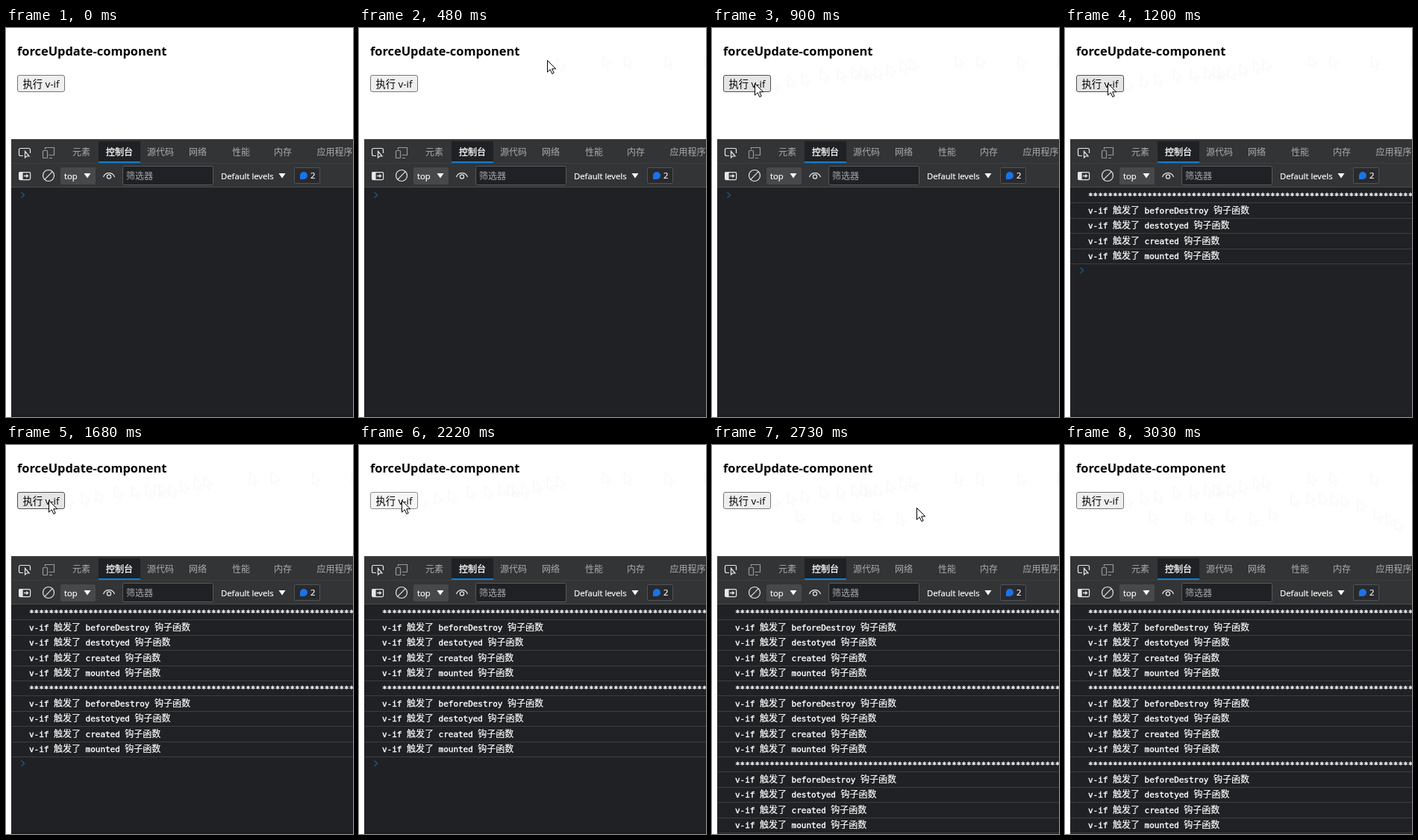
An HTML page that plays this animation: 465 px wide and 522 px high, repeating every 3960 ms.

```html
<!DOCTYPE html>
<html lang="zh-CN">
<head>
<meta charset="utf-8">
<title>forceUpdate-component</title>
<style>
  html, body { margin: 0; width: 100%; height: 100%; overflow: hidden; background: #fff; }
  svg { display: block; width: 465px; height: 522px; }
  text { font-family: "Open Sans", "Noto Sans", "Noto Sans CJK SC", "Noto Sans CJK", sans-serif; white-space: pre; }
  .title { font-weight: 700; font-size: 16.4px; }
  .btn rect { fill: #efefef; stroke: #767676; }
  .btn text { font-size: 13.33px; }
  .btn.hover rect { fill: #e5e5e5; stroke: #4f4f4f; }
  .btn.down rect { fill: #f5f5f5; stroke: #8d8d8d; }
  .tab { font-size: 12px; fill: #a8abae; }
  .tab.on { fill: #fff; stroke: #fff; stroke-width: .3; }
  .ui { font-size: 11.3px; fill: #fff; stroke: #fff; stroke-width: .2; }
  .hint { font-size: 12px; fill: #a3a8ad; }
  .icon { fill: none; stroke: #e6e7e8; stroke-width: 1.2; }
  .log text { font: 10.96px "DejaVu Sans Mono", monospace; fill: #fff; stroke: #fff; stroke-width: .4; }
  .log .zh { font: 12px "Noto Sans CJK SC", "Noto Sans CJK", sans-serif; stroke-width: .2; }
  .log path { stroke: #3c3f43; }
  #ghosts path { fill: none; stroke: #000; stroke-opacity: .035; }
</style>
</head>
<body>
<svg viewBox="0 0 465 522" xmlns="http://www.w3.org/2000/svg">
  <defs>
    <path id="arrow" d="M.5.5V16.2L4.2 12.7 6.8 18.5 9.2 17.4 6.7 11.8H11.7Z"/>
  </defs>
  <rect width="465" height="522" fill="#fff"/>
  <text class="title" x="15" y="36.5">forceUpdate-component</text>
  <g class="btn" id="btn">
    <rect x="15.5" y="63.5" width="63" height="22" rx="2.5"/>
    <text x="22.5" y="79.5">执行 v-if</text>
  </g>

  <rect x="7" y="149" width="458" height="373" fill="#202124"/>
  <rect x="7" y="149" width="458" height="65" fill="#333435"/>
  <path d="M7 149.5H465M7 213.5H465" stroke="#494c50"/>
  <path d="M7 181.5H465" stroke="#3d3f41"/>
  <rect x="7" y="519" width="458" height="3" fill="#201c24"/>

  <rect x="124" y="152" width="56" height="28" fill="#202124"/>
  <rect x="124" y="179" width="56" height="2" fill="#0a7fd6"/>
  <g id="tabs"></g>

  <g class="icon">
    <path d="M23 171.5H19.500a2 2 0 0 1-2-2V163.500a2 2 0 0 1 2-2H30.500a2 2 0 0 1 2 2V168"/>
    <path d="M25.500 165.500V174L27.700 172H31Z"/>
    <g stroke="#96999c">
      <path d="M52.500 163V160.500H64.500V170.500H57.500M58 174.500H62"/>
      <rect x="49.500" y="164.500" width="6" height="10" rx="1"/>
    </g>
    <rect x="17.600" y="193.600" width="15" height="10" rx="1.500"/>
    <path d="M18 194H22V203H18Z" fill="#e6e7e8"/>
    <path d="M24 198.500H28" stroke-width="1.500"/>
    <path d="M27.300 195.700L30.500 198.500 27.300 201.300Z" fill="#e6e7e8" stroke="none"/>
    <circle cx="57" cy="198" r="7.500"/>
    <path d="M51.700 203.300L62.300 192.700"/>
    <path d="M130.500 200C133 192.800 143 192.800 145.500 200"/>
    <circle cx="138" cy="199.500" r="2.600"/>
  </g>

  <rect x="73" y="187" width="47" height="23" rx="2" fill="#474849"/>
  <text class="ui" x="78" y="202.500">top</text>
  <path d="M104.500 195H113.500L109 201.500ZM365.500 195H374.500L370 201.500Z" fill="#fff"/>
  <rect x="156.500" y="185.500" width="121" height="25" rx="2" fill="#202124" stroke="#56595d"/>
  <text class="hint" x="161" y="203">筛选器</text>
  <text class="ui" x="288" y="202.500">Default levels</text>
  <rect x="386.500" y="187.500" width="34" height="21" rx="1" fill="#292a2d" stroke="#505356"/>
  <path d="M399 193A5 5 0 1 1 399 203H394V198A5 5 0 0 1 399 193Z" fill="#1a73e8"/>
  <text class="ui" x="408" y="202.200">2</text>

  <g id="logs"></g>
  <path id="prompt" d="M20.500 220.500L24.500 224.200 20.500 228" fill="none" stroke="#1a5380" stroke-width="1.600"/>
  <g id="ghosts"></g>
  <use id="cursor" href="#arrow" fill="#fff" stroke="#000" visibility="hidden"/>
</svg>
<script>
const LOOP = 3960, STEP = 30, ENTER = 330, LEAVE = 2580, ROW = 20.4;
const $ = id => document.getElementById(id);

// Pointer tips, one per step
const inPath = [
  [463, 36], [410, 37], [355, 36], [326, 36], [265, 41], [252, 43],
  [234, 47], [218, 52], [205, 52], [199, 52], [187, 52], [168, 54],
  [145, 55], [120, 60], [101, 63], [80, 67], [66, 71], [61, 72],
  [58, 73], [57, 74]
];
const outPath = [
  [113, 88], [162, 88], [188, 88], [217, 87], [248, 90], [274, 84],
  [303, 65], [324, 63], [341, 63], [356, 65], [370, 66], [392, 72],
  [414, 85], [430, 91], [442, 98]
];
// Press, release and log times of each click
const clicks = [[1080, 1170, 1200], [1530, 1650, 1680], [2130, 2250, 2280]];
const hooks = ['beforeDestroy', 'destotyed', 'created', 'mounted'];

const tabs = [['元素', 89], ['控制台', 134], ['源代码', 189], ['网络', 245],
  ['性能', 303], ['内存', 359], ['应用程序', 416.5]];
$('tabs').innerHTML = tabs.map(([name, x], i) =>
  `<text class="tab${i === 1 ? ' on' : ''}" x="${x}" y="170.5">${name}</text>`).join('');

const zh = s => `<tspan class="zh">${s}</tspan>`;
const lines = ['*'.repeat(72), ...hooks.map(h => `v-if ${zh('触发了')} ${h} ${zh('钩子函数')}`)];
const logRow = (line, i) => {
  const edge = Math.round(214 + ROW * (i + 1)) + .5;
  return `<text x="31" y="${Math.round(228.6 + ROW * i)}">${line}</text><path d="M7 ${edge}H465"/>`;
};
$('logs').innerHTML = clicks.map((_, n) =>
  `<g class="log">${lines.map((line, i) => logRow(line, n * 5 + i)).join('')}</g>`).join('');
const groups = [...$('logs').children];

// Faint trail left behind by the pointer
const trail = [
  ...inPath.slice(0, 16).map((p, i) => ({ p, at: ENTER + (i + 1) * STEP })),
  ...outPath.map((p, i) => ({ p, at: LEAVE + (i + 1) * STEP }))
];
$('ghosts').innerHTML = trail.map(({ p }) =>
  `<path d="${$('arrow').getAttribute('d')}" transform="translate(${p})"/>`).join('');
const ghosts = [...$('ghosts').children];

const show = (el, on) => el.setAttribute('visibility', on ? 'visible' : 'hidden');

function pointer(t) {
  if (t < ENTER) return null;
  if (t >= LEAVE) return outPath[Math.floor((t - LEAVE) / STEP)];
  return inPath[Math.min(Math.floor((t - ENTER) / STEP), inPath.length - 1)];
}

function draw(t) {
  const tip = pointer(t);
  show($('cursor'), tip);
  if (tip) $('cursor').setAttribute('transform', `translate(${tip})`);

  const hover = tip && tip[0] < 79 && tip[1] > 63 && tip[1] < 86;
  const down = clicks.some(([press, release]) => t >= press && t < release);
  $('btn').setAttribute('class', 'btn' + (hover ? ' hover' : '') + (down ? ' down' : ''));

  const count = clicks.filter(c => t >= c[2]).length;
  groups.forEach((g, i) => show(g, i < count));
  $('prompt').setAttribute('transform', `translate(0 ${Math.floor(count * (ROW * 5 - .5))})`);
  ghosts.forEach((g, i) => show(g, t >= trail[i].at));
}

function tick() {
  draw(performance.now() % LOOP);
  requestAnimationFrame(tick);
}
tick();
</script>
</body>
</html>
```
